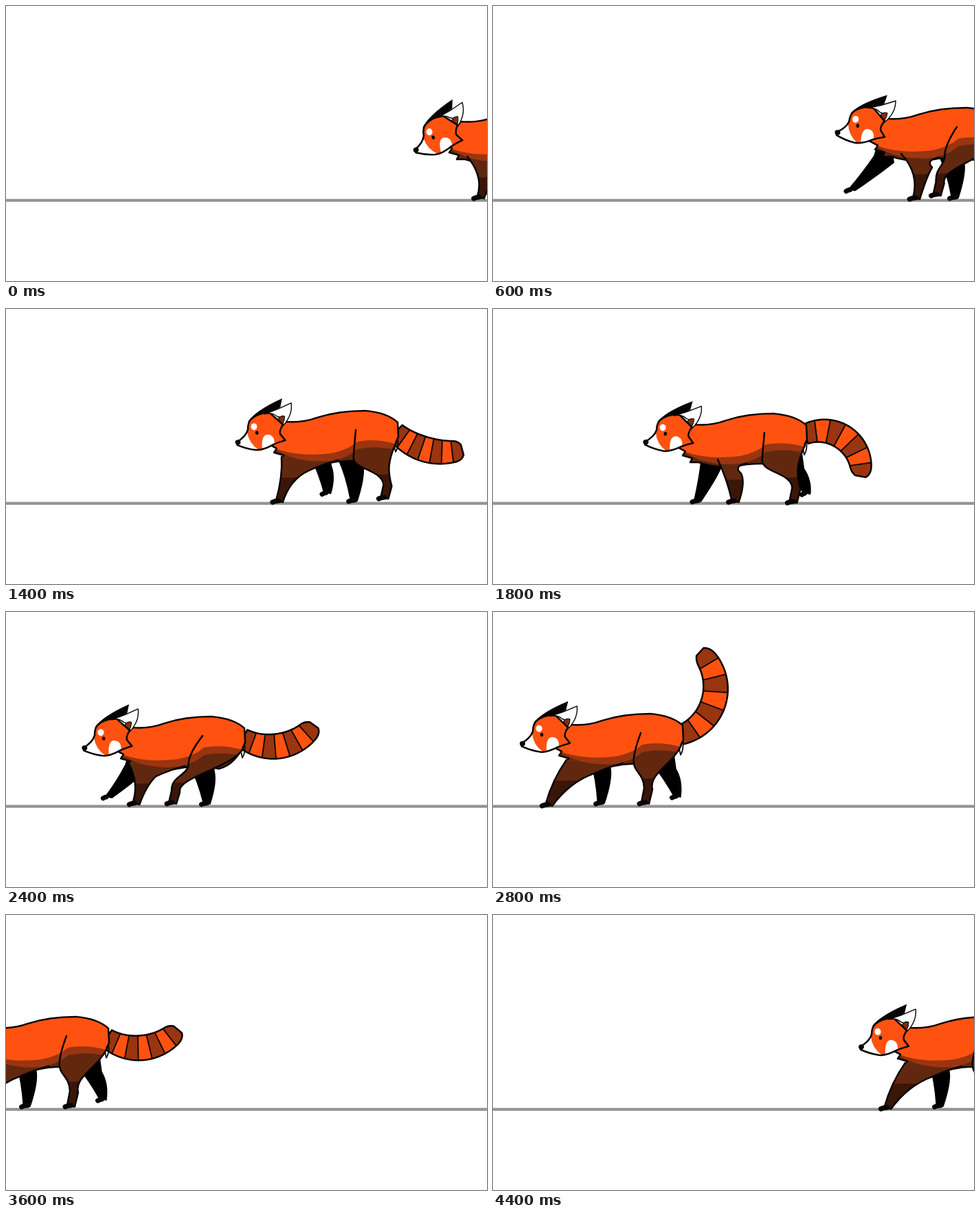
An HTML page with a canvas for the animation above (4600 ms loop, 700 by 400 pixels).

```html
<!DOCTYPE html>
<html lang="en">
<head>
<meta charset="utf-8">
<title>Walking red panda</title>
<style>
  html, body { margin: 0; width: 100%; height: 100%; overflow: hidden; background: #fff; }
  canvas { display: block; }
</style>
</head>
<body>
<canvas id="stage" width="700" height="400"></canvas>
<script>
const ctx = document.getElementById('stage').getContext('2d');
const LOOP = 4600, STEP = 200, STRIDE = 1600;
const ORANGE = '#ff5211', RUST = '#993510', BROWN = '#62270f', DARK = '#3a1609', INK = '#080404';

const linear = k => k;
const smooth = k => k * k * (3 - 2 * k);
const clamp = (v, low, high) => Math.min(high, Math.max(low, v));
const wave = (time, peak, period) => Math.cos(2 * Math.PI * (time - peak) / period);

// Value between [time, value] key points
function between(keys, time, ease) {
  const i = clamp(keys.findIndex(key => key[0] > time), 1, keys.length - 1);
  const [t0, a] = keys[i - 1], [t1, b] = keys[i];
  return a + (b - a) * ease(clamp((time - t0) / (t1 - t0), 0, 1));
}

const noseKeys = [[0, 588], [200, 532], [600, 499], [1400, 333], [1800, 219], [2200, 163],
  [2400, 110], [2800, 39], [3600, -88], [4400, -292]];
const tailKeys = [[1400, 15], [1800, -100], [2800, 138], [3600, 50], [4000, -110], [4400, -55]];

// Feet swing around a middle position behind the nose and lift twice per stride
const feet = {
  nearFore: { middle: 80, reach: 50, peak: 340, period: STRIDE, lift: 2, liftPeak: 0 },
  farFore: { middle: 70, reach: 56, peak: 1400, period: STRIDE, lift: 14, liftPeak: 680 },
  nearHind: { middle: 173, reach: 50, peak: 0, period: STRIDE, lift: 6, liftPeak: 600 },
  farHind: { middle: 197, reach: 40, peak: 280, period: STRIDE / 2, lift: 14, liftPeak: 300 }
};

function footAt({ middle, reach, peak, period, lift, liftPeak }, time) {
  return [middle + reach * wave(time, peak, period),
    283 - lift * (.5 + .5 * wave(time, liftPeak, STRIDE / 2))];
}

const shape = d => new Path2D(d);
const shades = [
  [RUST, shape('M-60 200H44Q82 221 140 214Q165 209 178 197Q210 191 250 205V320H-60Z')],
  [BROWN, shape('M-60 202H50Q86 230 140 225Q166 220 178 208Q210 201 250 213V320H-60Z')],
  [DARK, shape('M-60 248Q100 253 250 243V320H-60Z')]
];
const torso = shape('M74 168Q98 170 120 162Q150 152 190 152Q222 155 237 169L238 190Q224 222 200 228' +
  'Q180 223 150 226Q115 234 80 223L68 223L71 217L57 213L61 207L48 200Z');

function fill(path, color) { ctx.fillStyle = color; ctx.fill(path); }
function stroke(path, width = 2.5) {
  ctx.strokeStyle = INK;
  ctx.lineWidth = width;
  ctx.stroke(path);
}
function fur(path) {
  ctx.save();
  ctx.clip(path);
  fill(path, ORANGE);
  for (const [color, area] of shades) fill(area, color);
  ctx.restore();
  stroke(path);
}
function paw(x, y) {
  const length = clamp(10 - (283 - y) * .4, 4, 10);
  stroke(shape(`M${x + 1} ${y - 1}Q${x + 5} ${y - 3} ${x + length} ${y - 3}`), 7);
}

function drawTail(x, y, end) {
  const bend = Math.abs(end - 25), start = -50 + .6 * bend;
  const length = 100 + .2 * bend + .2 * Math.max(0, end);
  const bands = 7, perBand = 8, count = bands * perBand;
  const upper = [], lower = [];
  for (let i = 0; i <= count; i++) {
    const s = i / count, angle = (start + (end - start) * s) * Math.PI / 180;
    const tip = Math.max(0, (s - .86) / .14);
    const half = (14 + 4 * Math.sin(Math.PI * s)) * Math.sqrt(1 - .7 * tip ** 3);
    const nx = Math.sin(angle) * half, ny = Math.cos(angle) * half;
    upper.push([x - nx, y - ny]);
    lower.push([x + nx, y + ny]);
    x += Math.cos(angle) * length / count;
    y -= Math.sin(angle) * length / count;
  }
  const outline = (from, to) => shape('M' +
    [...upper.slice(from, to + 1), ...lower.slice(from, to + 1).reverse()].join('L') + 'Z');
  for (let band = 0; band < bands; band++) {
    const cut = band * perBand;
    fill(outline(cut, cut + perBand), band % 2 ? ORANGE : RUST);
    stroke(shape(`M${upper[cut]}L${lower[cut]}`), 1.8);
  }
  stroke(outline(0, count));
}

function drawFarLeg(left, width, [x, y]) {
  const right = left + width;
  fill(shape(`M${left + 6} 203L${left} 222Q${(left + x) / 2 + 4} 246 ${x + 3} ${y - 3}L${x + 14} ${y - 1}` +
    `Q${(right + x) / 2 + 14} 249 ${right} 232L${right - 4} 203Z`), '#000');
  paw(x, y);
}

function drawForeLeg([x, y]) {
  const top = Math.max(68, .8 * x + 10);
  fur(shape(`M${top} 219Q${Math.min(x + 16, 122)} 248 ${x + 6} ${y - 3}L${x + 16} ${y - 1}` +
    `Q${Math.max(x + 26, 72)} 252 ${clamp(x + 34, 108, 142)} 239Q130 229 150 224`));
  paw(x, y);
}

function drawHindLeg([x, y]) {
  const knee = 165 + (x - 170) * .2;
  fur(shape(`M176 180Q${knee + 1} 205 ${knee} 220C${knee} 238 ${x + 7} 238 ${x + 8} 260L${x + 4} ${y - 3}` +
    `L${x + 15} ${y - 1}L${x + 20} 262C${x + 14} 240 222 226 235 198`));
  paw(x, y);
}

function oval(x, y, rx, ry, color) {
  ctx.beginPath();
  ctx.ellipse(x, y, rx, ry, 0, 0, 2 * Math.PI);
  ctx.fillStyle = color;
  ctx.fill();
}

function drawHead(tilt) {
  ctx.save();
  ctx.translate(75, 178);
  ctx.rotate(tilt);
  ctx.translate(-75, -178);
  fill(shape('M19 167Q30 151 70 134L67 147L48 156Q32 156 19 167Z'), INK);
  const face = shape('M2 196Q16 188 19 178Q19 168 24 163Q36 153 52 155L70 172Q64 182 66 186' +
    'L73 195Q62 198 55 201Q40 209 30 208Q16 206 3 200Z');
  fill(face, ORANGE);
  fill(shape('M2 196Q14 190 18 182Q20 198 34 208Q16 207 3 200Z'), '#fff');
  fill(shape('M39 206Q38 187 47 186Q58 187 57 200Q48 205 39 206Z'), '#fff');
  stroke(face);
  const ear = shape('M44 156Q64 150 83 141Q85 158 71 173Q68 160 62 160Q54 153 44 156Z');
  fill(ear, '#fff');
  stroke(ear, 1.4);
  const inner = shape('M63 164Q67 158 73 160Q73 166 70 171Z');
  fill(inner, '#793010');
  stroke(inner, 1);
  oval(28, 174, 4.5, 5, '#fff');
  oval(32, 183, 2.3, 2.8, INK);
  oval(4, 196, 4, 3.6, INK);
  ctx.restore();
}

function draw(time) {
  // The stride doubles its pace while the animal leaves the stage
  const gait = time + Math.max(0, time - 2800);
  const rise = -2 + 3 * wave(gait, 100, STRIDE / 2);
  const foot = name => {
    const [x, y] = footAt(feet[name], gait);
    return [x, y - rise];
  };
  ctx.fillStyle = '#fff';
  ctx.fillRect(0, 0, 700, 400);
  ctx.fillStyle = '#959292';
  ctx.fillRect(0, 280.6, 700, 4.2);

  ctx.save();
  ctx.translate(between(noseKeys, time, linear), rise);
  drawTail(234, 183, between(tailKeys, time, smooth));
  const back = foot('farHind'), front = foot('farFore');
  drawFarLeg(144 + .72 * (back[0] - 157), 38, back);
  drawFarLeg(48 + .5 * front[0], 30, front);
  fur(torso);
  stroke(shape('M237 192Q239 204 234 212L232 203'), 1.8);
  drawHindLeg(foot('nearHind'));
  drawForeLeg(foot('nearFore'));
  drawHead(-.19 * wave(time, 0, 1200) * Math.exp(-time / 1100));
  ctx.restore();
}

ctx.lineCap = ctx.lineJoin = 'round';
const began = performance.now();
function tick() {
  const elapsed = (performance.now() - began) % LOOP;
  draw(Math.floor(elapsed / STEP) * STEP);
  requestAnimationFrame(tick);
}
tick();
</script>
</body>
</html>
```
